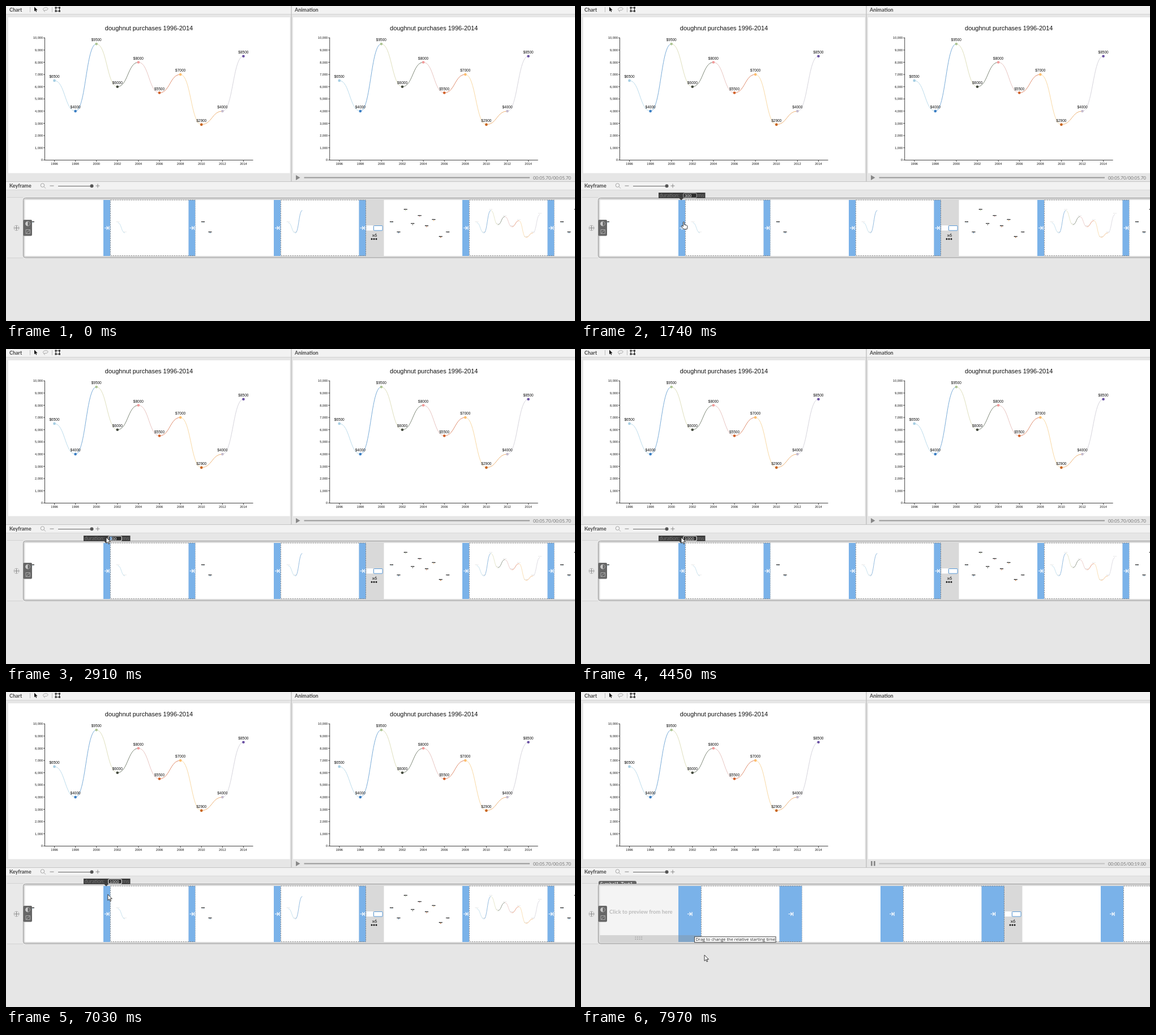
An HTML page that plays this animation: 1005 px wide and 557 px high, repeating every 8000 ms.

```html
<!DOCTYPE html>
<html lang="en">
<head>
<meta charset="utf-8">
<title>Keyframe editor</title>
<style>
  html, body { margin: 0; width: 100%; height: 100%; overflow: hidden; background: #e6e6e6; }
  svg { display: block; }
  text { font-family: Lato, sans-serif; font-size: 9px; fill: #444; }
  .bold { font-weight: 700; }
  .mid { text-anchor: middle; }
  .end { text-anchor: end; }
  .arial { font-family: "Liberation Sans", Arial, sans-serif; fill: #111; }
  .title { font-size: 11px; }
  .value { font-size: 6.5px; }
  .axis { font-size: 5.6px; }
  .time { font-size: 8px; fill: #777; }
  .tip { font: 7.5px "Open Sans", sans-serif; fill: #222; }
  .line { fill: none; stroke: #444; }
  .thin { fill: none; stroke: #888; }
  .small text { stroke: #111; stroke-width: 1; }
  .small path { stroke-width: 2.4; }
  .faint text { opacity: .25; stroke: none; }
</style>
</head>
<body>
<svg id="stage" width="1005" height="557" viewBox="0 0 1005 557"></svg>
<script>
const LOOP = 8000, COMMIT = 7870;
const values = [6500, 4000, 9500, 6000, 8000, 5500, 7000, 2900, 4000, 8500];
const dotColors = ['#a6cee3', '#3b7fc4', '#b0c795', '#444a3f', '#f29a9a',
  '#d0602a', '#fdbf6f', '#c8641e', '#c6bccf', '#6a51a3'];
const linkColors = ['#bcdcec', '#78abd8', '#dfe0be', '#7f8979', '#e8c4c0',
  '#e08c6c', '#f9d9a4', '#eeb377', '#d6d4dc'];

const rect = (x, y, w, h, fill, more = '') =>
  `<rect x="${x}" y="${y}" width="${w}" height="${h}" fill="${fill}" ${more}/>`;
const path = (d, more = 'class="line"') => `<path d="${d}" ${more}/>`;
const dot = (x, y, r, fill) => `<circle cx="${x}" cy="${y}" r="${r}" fill="${fill}"/>`;
const text = (x, y, s, cls = '', more = '') =>
  `<text x="${x}" y="${y}" class="${cls}" ${more}>${s}</text>`;
const group = (inner, more = '') => `<g ${more}>${inner}</g>`;
const shift = (x, y) => `transform="translate(${x} ${y})"`;
const times = (n, f) => Array.from({ length: n }, (_, i) => f(i)).join('');

const ARROW = 'M0 0V10.5L2.5 8.3 4.2 12 5.8 11.3 4.1 7.7H7.5Z';
const HAND = 'M-1 .6Q0-.6 1 .6V5L5 6Q7 6.6 6.6 9L5.8 13H0L-4 8.2Q-4.2 6.4-2.6 6.8L-1 8.2Z';
const IBEAM = 'M-2-5H2M0-5V5M-2 5H2';

// Chart
const px = i => 85.5 + 37.1 * i;
const py = v => 272.3 - 0.0216 * v;

function link(i) {
  const m = (px(i) + px(i + 1)) / 2, a = py(values[i]), b = py(values[i + 1]);
  return path(`M${px(i)} ${a}C${m} ${a} ${m} ${b} ${px(i + 1)} ${b}`,
    `fill="none" stroke="${linkColors[i]}"`);
}
const mark = i => dot(px(i), py(values[i]), 2.3, dotColors[i]);
const label = i => text(px(i), py(values[i]) - 4.8, '$' + values[i], 'arial value mid');

const chart = () =>
  text(252.5, 43, 'doughnut purchases 1996-2014', 'arial title mid') +
  path('M68.5 56V272.5H436.5') +
  times(11, i => path(`M66 ${py(i * 1000)}h3`) +
    text(65, py(i * 1000) + 2, (i * 1000).toLocaleString('en-US'), 'arial axis end')) +
  times(10, i => path(`M${px(i)} 272.5v3`) +
    text(px(i), 281, 1996 + 2 * i, 'arial axis mid')) +
  times(9, link) + times(10, mark) + times(10, label);

// Timeline strip; bar is the width of the blue duration blocks
const slots = [[1, 0], [2, 1], [2, 0], [2, 2], [9, 0], [10, 9], [10, 0]];

function gap(x) {
  return rect(x + 1, 388, 12, 9, '#fff') +
    rect(x + 14, 388.5, 15.5, 8.5, '#fff', 'stroke="#5b9bd8" rx="1"') +
    text(x + 15.5, 407.5, 'x6', 'mid', 'style="font-size:8px;fill:#111"') +
    times(3, i => dot(x + 10.5 + 4 * i, 412, 1.5, '#111'));
}

function strip(bar, filled) {
  let x = 33.5, out = '';
  slots.forEach(([labels, links], k) => {
    if (k === 4) { out += gap(x); x += 32; }
    const end = x + 138.5;
    out += rect(x, 343, 138.5, 99, '#fff');
    if (filled) {
      out += group(times(links, link) + (links ? '' : times(labels, mark)) + times(labels, label),
        `class="small ${links ? 'faint' : ''}" transform="translate(${x - 15} 339.1) scale(.334)"`);
    }
    out += rect(end, 343, bar, 99, '#7ab2e9') +
      group(path('M-4 0H2.5M-.5-3L2.5 0-.5 3M4-3.5V3.5', 'fill="none" stroke="#fff" stroke-width="1.2"'),
        shift(end + bar / 2, 392.5));
    if (k % 2) {
      out += rect(x + .5, 343, 138 + bar, 98.5, 'none', 'stroke="#777" stroke-width=".8" stroke-dasharray="2.5 1.5"');
    }
    x = end + bar;
  });
  return out;
}

const toolbar =
  path('M42.5 2V11M81.5 2V11', 'class="thin" opacity=".5"') +
  path(ARROW, 'fill="#111" transform="translate(50 1.5) scale(.75)"') +
  path('M67 8C63 5 68 2 72 3 76 4 74 8 69 7.5 66 7 67 10 69 10', 'class="thin" opacity=".7"') +
  rect(88, 3, 6.5, 6, 'none', 'stroke="#333"') +
  times(4, i => rect(86.5 + 6.5 * (i % 2), 1.5 + 6 * (i >> 1), 3, 3, '#333'));

const zoom =
  path('M67 319.5L70 322.5M67.8 317a3.3 3.3 0 1 1-6.6 0a3.3 3.3 0 1 1 6.6 0', 'class="thin" opacity=".7"') +
  path('M77.5 318H84.5M158.5 318H165.5M162 314.5V321.5', 'class="thin"') +
  path('M92 318.5H152', 'fill="none" stroke="#666"') + dot(151.5, 318.3, 3, '#555');

const badge =
  rect(30.5, 378, 15.5, 28.5, '#666', 'rx="2"') +
  path('M38.5 381a4 4 0 0 0 0 8z', 'fill="#ccc"') +
  path('M38.5 381a4 4 0 1 1-.1 0M35 395.5h7.5v7H35zM36 401.5L41.5 396.5', 'fill="none" stroke="#bbb" stroke-width=".8"');

const addButton =
  rect(2, 338.5, 28, 107, '#e9e9e9') + path('M2 338.5H30M2 445.5H30', 'fill="none" stroke="#d2d2d2"') +
  `<circle cx="18.5" cy="392.5" r="4.5" class="thin" stroke-dasharray="1.2 1"/>` +
  path('M14 392.5H23M18.5 388V397', 'class="thin"');

const durationTip =
  rect(137, 330, 82.5, 9.8, '#3d3d3d') + path('M173 339.5h8l-4 4z', 'fill="#3d3d3d"') +
  text(138.5, 337.8, 'duration:', '', 'style="fill:#777"') +
  text(206, 337.8, 'ms', '', 'style="fill:#777"') +
  rect(180.8, 331, 23.5, 8, '#2b2b2b', 'id="field" stroke="#eee" rx="2"') +
  rect(183, 332, 4.4, 6, '#4a7fb8', 'id="selection"') +
  text(183, 337.7, '300', 'arial', 'id="digits" style="font-size:7.5px;fill:#eee"') +
  rect(191.2, 332, .8, 6, '#fff', 'id="caret"');

const startTip =
  rect(200.5, 432.8, 143.5, 9.8, '#fff', 'stroke="#444"') +
  text(202.5, 440.3, 'Drag to change the relative starting time', 'tip');

document.getElementById('stage').innerHTML =
  rect(0, 0, 1005, 557, '#e6e6e6') +
  rect(0, 0, 1005, 14, '#f2f2f2') + path('M0 14.5H1005', 'stroke="#d4d4d4"') +
  rect(4, 20, 497.5, 275.5, '#fff') + rect(507, 20, 498, 275.5, '#fff') +
  path('M504 0V310', 'stroke="#c2c2c2" stroke-width="1.5"') +
  text(6, 9.5, 'Chart', 'bold') + text(510, 9.5, 'Animation', 'bold') + toolbar +
  group(chart()) + group(chart(), 'id="preview" ' + shift(503.2, 0)) +
  path('M512 299V308L519.5 303.5Z', 'id="play" fill="#888"') +
  path('M512 299h2.7v8.5H512zM517 299h2.7v8.5H517z', 'id="pause" fill="#888"') +
  path('M526.5 303.5H925', 'id="progress" stroke="#999" stroke-width="2"') +
  text(998, 306.7, '', 'time end', 'id="clock"') +
  rect(0, 310.5, 1005, 14.5, '#f2f2f2') +
  path('M0 310.5H1005', 'stroke="#c4c4c4"') + path('M0 325.3H1005', 'stroke="#d8d8d8"') +
  text(6, 321, 'Keyframe', 'bold') + zoom + addButton +
  group(path('M31 341V331q0-3 3-3H95q3 0 3 3V341Z', 'fill="#666"') +
    text(34, 337, 'Symbol1, Text1', '', 'style="font-size:8.6px;fill:#fff"'), 'id="tab"') +
  rect(30.5, 339.5, 990, 105.5, '#d9d9d9', 'stroke="#999" rx="4"') +
  group(strip(12, true), 'id="before"') + group(strip(40, false), 'id="after"') +
  group(rect(33.5, 343, 138.5, 99, '#e9e9e9', 'opacity=".94"') +
    rect(33.5, 430, 0, 12, '#8d8d8d', 'id="handle" opacity=".7"') +
    times(8, i => rect(95.5 + 3.6 * (i % 4), 432.5 + 3.6 * (i >> 2), 1.8, 1.8, '#555')) +
    text(50, 392.3, 'Click to preview from here', 'bold', 'style="font-size:9.5px;fill:#777"'), 'id="panel"') +
  badge + group(durationTip, 'id="duration"') + group(startTip, 'id="start"') +
  group(`<circle id="press" cy="1" r="6.3" fill="#ecdf1c" opacity=".75"/>` +
    path(ARROW, 'id="arrow" fill="#fff" stroke="#222" stroke-width=".9"') +
    path(HAND, 'id="hand" fill="#fff" stroke="#222" stroke-width=".9"') +
    path(IBEAM, 'id="beam" fill="none" stroke="#222" stroke-width=".8"'), 'id="pointer"');

// Motion: [time, ...values], linear between entries
const pointerKeys = [[140, 643, 552], [460, 195, 477], [600, 195, 477], [940, 172, 403],
  [1440, 177, 418], [1500, 177, 418], [2050, 187, 335], [2480, 187, 335], [2760, 177, 333],
  [6100, 177, 333], [6170, 177, 335], [6470, 179, 346], [6570, 179, 346], [7110, 180, 360],
  [7210, 180, 360], [7410, 180, 366], [7500, 180, 366], [7790, 190, 414], [7970, 218, 465]];
const hoverKeys = [[760, 0], [900, 1], [1500, 1], [1700, 0], [7869, 0], [7870, 1], [7970, .5]];

function at(keys, t) {
  const i = keys.findIndex(k => k[0] > t);
  if (i < 0) return keys[keys.length - 1].slice(1);
  if (i === 0) return keys[0].slice(1);
  const a = keys[i - 1], b = keys[i], f = (t - a[0]) / (b[0] - a[0]);
  return a.slice(1).map((v, n) => v + (b[n + 1] - v) * f);
}

const $ = Object.fromEntries([...document.querySelectorAll('#stage [id]')].map(e => [e.id, e]));
const show = (name, on) => { $[name].style.display = on ? '' : 'none'; };
const within = (t, a, b) => t >= a && t < b;

function draw(t) {
  const done = t >= COMMIT;
  const [x, y] = at(pointerKeys, t), [hover] = at(hoverKeys, t);
  const hand = within(t, 780, 1960), beam = within(t, 1960, 2520);

  $.pointer.setAttribute('transform', `translate(${x} ${y})`);
  show('pointer', t >= 140);
  show('hand', hand);
  show('beam', beam);
  show('arrow', !hand && !beam);
  show('press', within(t, 2350, 2910));

  show('tab', hover > 0);
  $.tab.setAttribute('transform', `translate(0 ${12 * (1 - hover)})`);
  $.panel.setAttribute('opacity', hover);
  $.handle.setAttribute('width', done ? 178.5 : 150.5);

  show('duration', within(t, 1300, COMMIT));
  $.field.setAttribute('stroke-width', t < 2350 ? .7 : 1.1);
  show('selection', within(t, 2640, 3680));
  show('caret', within(t, 3910, 4450));
  $.digits.textContent = t < 3680 ? '300' : t < 3910 ? '100' : '1000';

  show('before', !done);
  show('after', done);
  show('start', done);
  show('preview', !done);
  show('play', !done);
  show('pause', done);
  $.progress.setAttribute('stroke', done ? '#c4c4c4' : '#999');
  const played = Math.min(5, Math.max(0, Math.floor((t - COMMIT) / 20)));
  $.clock.textContent = done ? `00:00.0${played}/00:19.00` : '00:05.70/00:05.70';
}

function tick() {
  draw(performance.now() % LOOP);
  requestAnimationFrame(tick);
}
tick();
</script>
</body>
</html>
```
